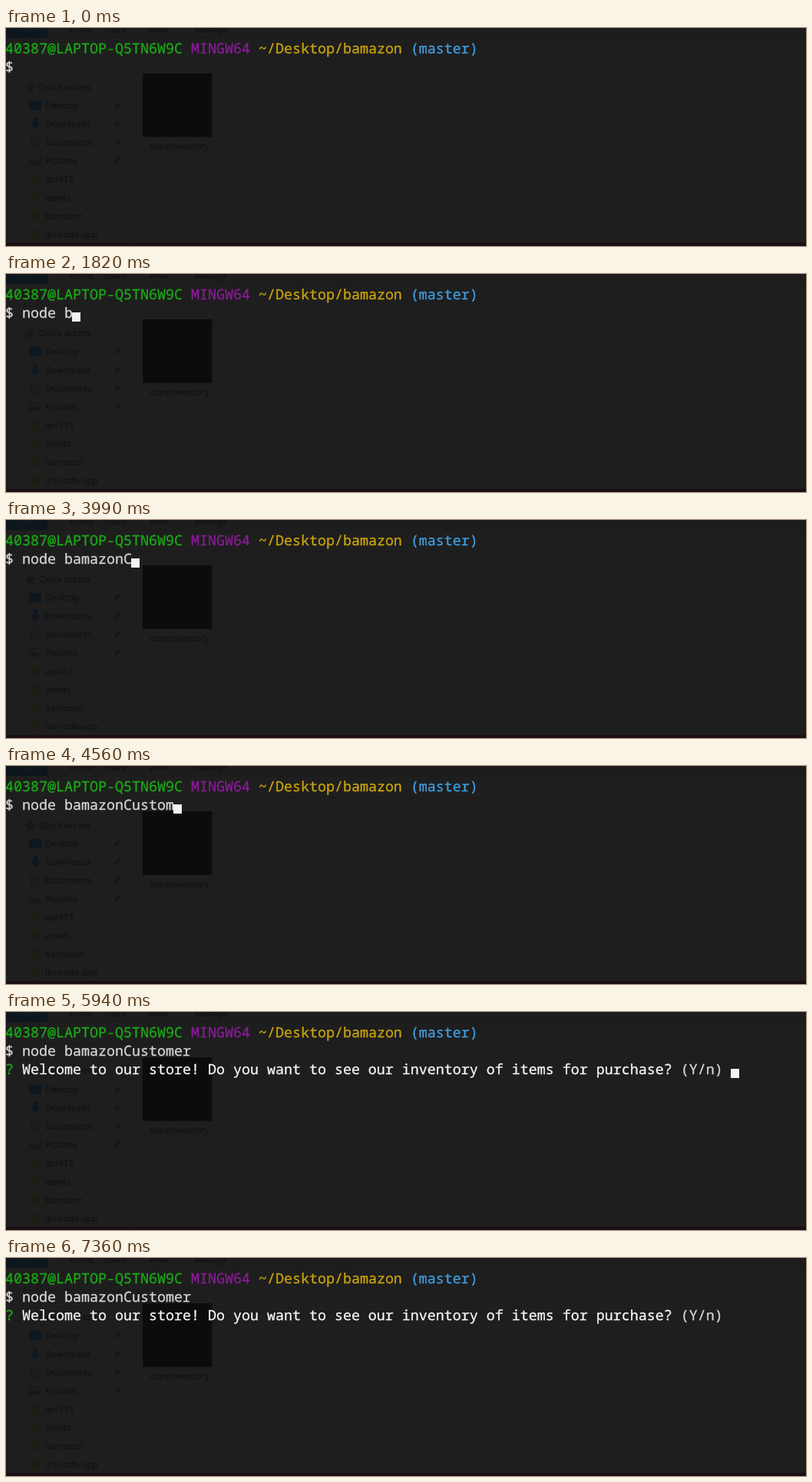
These frames come from a looping animation (1042 px wide and 284 px high, 7.6 s). An HTML page:

```html
<!DOCTYPE html>
<html lang="en">
<head>
<meta charset="utf-8">
<title>Terminal session</title>
<style>
  html, body { margin: 0; width: 100%; height: 100%; overflow: hidden; background: #1e1e1e; }
  svg { display: block; width: 1042px; height: 284px; }
  text { white-space: pre; text-rendering: geometricPrecision; }
  .files text { font: 11.4px "Open Sans", "Noto Sans", sans-serif; fill: #0e0e0e; }
  .term { --ink: #d6d6d6; }
  .term text { font: 18.3333px "Noto Sans Mono", "DejaVu Sans Mono", monospace; }
  .term text, .term tspan { fill: var(--ink); stroke: var(--ink); stroke-width: .3px; }
  .green { --ink: #1aab16; }
  .magenta { --ink: #8a1c99; }
  .yellow { --ink: #cba50c; }
  .cyan { --ink: #409fe0; }
  .bright { --ink: #f6f6f6; }
  #cursor { fill: #f2f2f2; }
</style>
</head>
<body>
<svg viewBox="0 0 1042 284">
  <defs>
    <path id="pin" d="M5 0l4 4-2 .5-2 2-.5 2.500-2-2L0 9l2-2.500L0 4.500 2.500 4l2-2z" fill="#161616"/>
    <g id="folder">
      <path d="M2 1h9l1 2v11H2z" fill="#1f1c15"/>
      <path d="M12 3h2v11h-2z" fill="#1d1a14"/>
    </g>
  </defs>

  <rect width="1042" height="284" fill="#1e1e1e"/>

  <g class="files">
    <rect width="1042" height="13" fill="#1d1d1d"/>
    <rect width="54" height="13" fill="#0d161d"/>
    <text x="18" y="6" style="fill:#1e2226">File</text>
    <text x="83" y="6">Home</text>
    <text x="127" y="6">Share</text>
    <text x="186" y="6">View</text>
    <text x="245" y="6">Manage</text>
    <path d="M54 13.500H1042M0 41.500H1040M159.500 42V280" stroke="#1b1b1b"/>

    <path d="M32 70l2 5 5 .5-4 3.500 1 5-4.500-2.500L27 84l1-5-4-3 5-.5z" fill="#12181c"/>
    <text x="43" y="81">Quick access</text>
    <g id="places"></g>

    <rect x="30" y="95" width="16" height="12" fill="#0d171f"/>
    <path d="M35.500 117h5v7H45l-7 8-7-8h4.500z" fill="#0e1720"/>
    <path d="M32.500 142.500h8l3 3v11h-11z" fill="#1d1d1d" stroke="#171717"/>
    <path d="M35 147h6M35 150h7M35 153h7" stroke="#14181c"/>
    <rect x="30.500" y="167.500" width="15" height="11" fill="#1d1e1e" stroke="#171717"/>
    <path d="M32 177v-4l4-2 3 3 5-1v4z" fill="#10181e"/>

    <rect x="178" y="59" width="90.500" height="83" fill="#0c0c0c"/>
    <text x="187" y="158">storeinventory</text>
  </g>

  <path d="M1040.500 0V280" stroke="#181818" stroke-dasharray="3 3"/>
  <rect y="280" width="1042" height="4" fill="#1c0e13"/>

  <g class="term">
    <text x="-1" y="33"><tspan class="green">40387@LAPTOP-Q5TN6W9C</tspan> <tspan class="magenta">MINGW64</tspan> <tspan class="yellow">~/Desktop/bamazon</tspan> <tspan class="cyan">(master)</tspan></text>
    <text id="command" x="-1" y="57">$ </text>
    <text id="question" x="-1" y="81" visibility="hidden"><tspan class="green">?</tspan> <tspan class="bright">Welcome to our store! Do you want to see our inventory of items for purchase?</tspan> (Y/n) </text>
    <rect id="cursor" width="11" height="12" visibility="hidden"/>
  </g>
</svg>

<script>
const LOOP = 7600, CELL = 11, LEFT = -2;
const COMMAND = "node bamazonCustomer";
const QUESTION_COLS = 86;
const $ = id => document.getElementById(id);

// Arrival time of each typed character
const typed = [
  680, 860, 1030, 1200, 1350,
  1820, 2050, 2830, 2990, 3110, 3240, 3380,
  3990, 4130, 4230, 4330, 4430, 4530, 4630, 4740
];
const ENTER = 5480, ASKED = 5780;

// Spans in which the cursor is lit
const lit = [
  [500, 1500], [1820, 2580], [2830, 3680], [3990, 4740],
  [4860, 5250], [5480, 5780], [5940, 6260], [6810, 7360]
];

const places = ["Desktop", "Downloads", "Documents", "Pictures",
                "april13", "assets", "bamazon", "liri-node-app"];
$("places").innerHTML = places.map((name, i) => {
  const y = 101 + 24 * i;
  const icon = i < 4
    ? `<use href="#pin" x="141" y="${y - 5}"/>`
    : `<use href="#folder" x="30" y="${y - 8}"/>`;
  return `<text x="51" y="${y + 4}">${name}</text>${icon}`;
}).join("");

const show = (el, on) => el.setAttribute("visibility", on ? "visible" : "hidden");

function draw(t) {
  const count = typed.filter(at => at <= t).length;
  const entered = t >= ENTER, asked = t >= ASKED;
  const col = asked ? QUESTION_COLS : entered ? 0 : 2 + count;

  $("command").textContent = "$ " + COMMAND.slice(0, count);
  show($("question"), asked);
  $("cursor").setAttribute("x", LEFT + CELL * col);
  $("cursor").setAttribute("y", entered ? 74 : 50);
  show($("cursor"), lit.some(([on, off]) => t >= on && t < off));
}

const start = performance.now();
function tick() {
  draw((performance.now() - start) % LOOP);
  requestAnimationFrame(tick);
}
tick();
</script>
</body>
</html>
```
